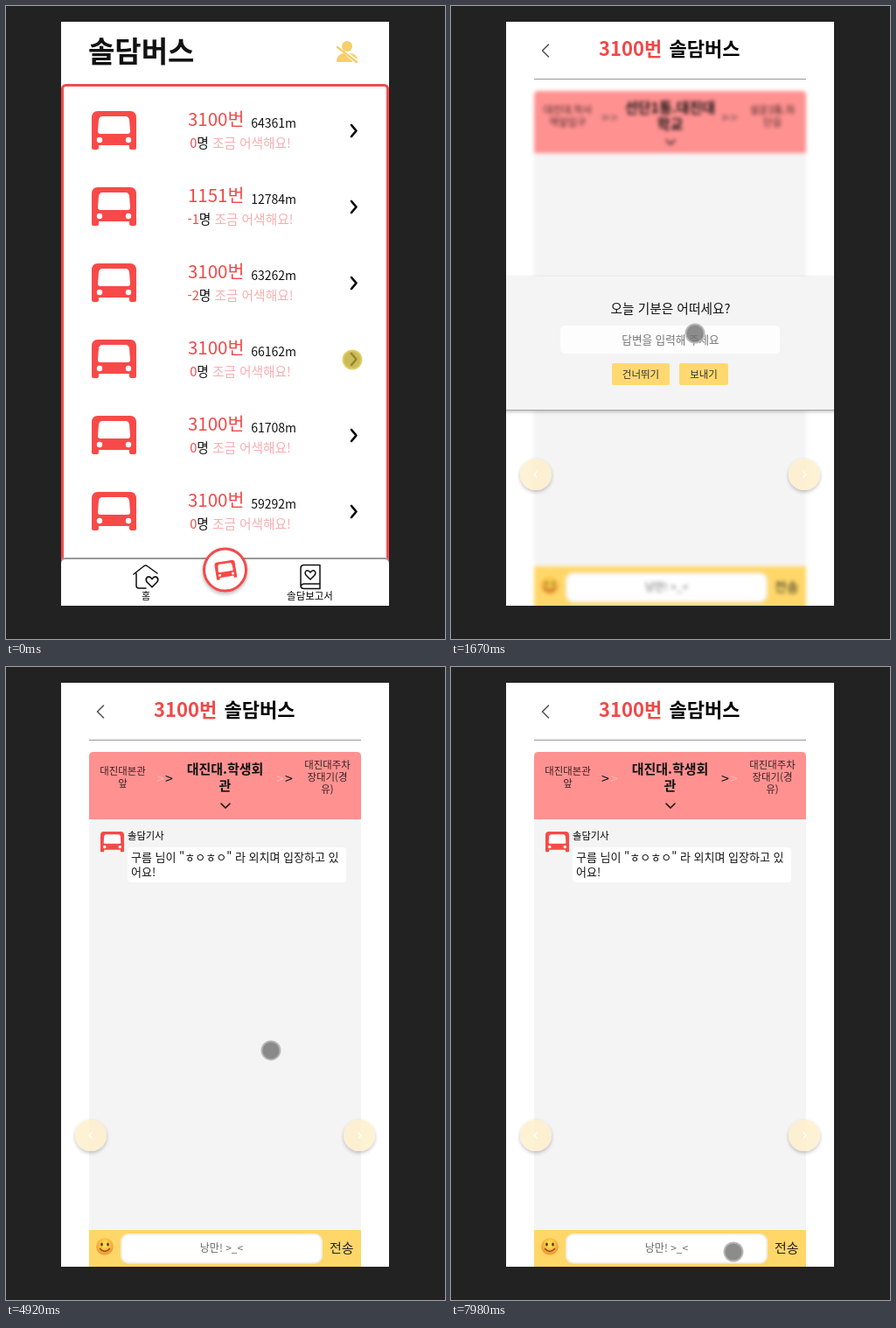
Recreate the animation shown at these times as an HTML page. Size 502x723 px, loop 8 s.

```html
<!DOCTYPE html>
<html lang="ko">
<head>
<meta charset="utf-8">
<style>
  html, body { margin: 0; width: 100%; height: 100%; overflow: hidden; background: #222223; }
  svg { display: block; width: 502px; height: 723px; font-family: 'Noto Sans CJK KR', 'Noto Sans CJK', sans-serif; }
  text { white-space: pre; }
  .mid { text-anchor: middle; }
  .line { fill: none; stroke-linecap: round; stroke-linejoin: round; }
</style>
</head>
<body>
<svg viewBox="0 0 502 723">
  <defs>
    <clipPath id="phone"><rect x="63" y="18" width="375" height="667"/></clipPath>
    <radialGradient id="face" cy=".35">
      <stop offset=".3" stop-color="#ffd84d"/><stop offset="1" stop-color="#f2a03a"/>
    </radialGradient>
    <filter id="drop" x="-30%" y="-30%" width="160%" height="170%">
      <feDropShadow dx="0" dy="2" stdDeviation="2" flood-opacity=".3"/>
    </filter>
    <g id="bus">
      <path fill="#f74a48" d="M7 0H44Q51 0 51 8V42Q51 44 49 44H45Q43 44 43 42V39H8V42Q8 44 6 44H2Q0 44 0 42V8Q0 0 7 0Z"/>
      <path fill="#fff" d="M12 6H39Q42 6 43 10L44 23Q44 26 41 26H10Q7 26 7 23L8 10Q9 6 12 6Z"/>
      <circle cx="9" cy="33" r="3.2" fill="#fff"/><circle cx="42" cy="33" r="3.2" fill="#fff"/>
    </g>
    <path id="heart" d="M0 5L-5 0Q-7 -3 -4.500 -5Q-2 -6 0 -3Q2 -6 4.500 -5Q7 -3 5 0Z"/>
  </defs>
  <rect width="502" height="723" fill="#222223"/>
  <g clip-path="url(#phone)">
    <rect x="63" y="18" width="375" height="667" fill="#fff"/>

    <g id="list">
      <text x="94" y="64" font-size="33" font-weight="900" fill="#111">솔담버스</text>
      <g fill="#f5cf69">
        <circle cx="390" cy="46" r="6"/>
        <path d="M378 64Q378 55 386 54L397 64Z M392 54Q401 54 402 61Z"/>
        <path class="line" stroke="#f5cf69" stroke-width="2.500" d="M379 47L401 64"/>
      </g>
      <rect x="64.500" y="90.500" width="372" height="600" rx="4" fill="#fff" stroke="#f24b4b" stroke-width="3"/>
      <g id="rows"></g>
      <rect x="62" y="631" width="377" height="60" rx="6" fill="#fff" stroke="#999" stroke-width="2"/>
      <g class="line" stroke="#111" stroke-width="1.500">
        <path d="M146 649L158 639.500Q160 638.500 162 640L173 648M149 648V662Q149 665 152 665H160"/>
        <use href="#heart" transform="translate(167 658) scale(1.150)" fill="#fff"/>
        <path d="M359 660V638.500H340Q337 639 337 642V662Q337 665.500 341 665.500H359V660H341Q338 660 337 663"/>
        <use href="#heart" transform="translate(348 650)"/>
      </g>
      <g class="mid">
        <text x="160" y="678" font-size="11">홈</text>
        <text x="347.500" y="678" font-size="11.500">솔담보고서</text>
      </g>
      <circle cx="250.500" cy="644" r="24" fill="#fff" stroke="#f24b4b" stroke-width="3" filter="url(#drop)"/>
      <use href="#bus" transform="translate(238 636) rotate(-9) scale(.46)"/>
    </g>

    <g id="room">
      <path class="line" stroke="#555" stroke-width="1.600" d="M111.500 44L104.500 51L111.500 58"/>
      <g font-size="22" font-weight="900">
        <text x="169" y="57" fill="#f24848">3100번</text>
        <text x="249.500" y="57">솔담버스</text>
      </g>
      <path stroke="#999" d="M95 83.500H406"/>
      <g id="panel">
        <rect x="95" y="100" width="311" height="585" fill="#f4f4f4"/>
        <path id="header" fill="#ff9191"/>
        <g id="stops" class="mid"></g>
        <g id="arrows" font-size="16"></g>
        <path id="down" class="line" stroke="#111" stroke-width="1.500" d="M246 156L251 161L256 156"/>
        <g id="message">
          <use href="#bus" transform="translate(108 188) scale(.53)"/>
          <text x="139" y="197" font-size="11.300">솔담기사</text>
          <rect x="139" y="206" width="250" height="40" rx="4" fill="#fff"/>
          <g font-size="13" fill="#111">
            <text x="143" y="222">구름 님이 "ㅎㅇㅎㅇ" 라 외치며 입장하고 있</text>
            <text x="143" y="238.500">어요!</text>
          </g>
        </g>
        <rect id="bar" x="95" width="311" height="50" fill="#ffd769"/>
        <rect x="132" y="648" width="229" height="32.500" rx="8" fill="#fff" stroke="#f1efe8" stroke-width="2"/>
        <text class="mid" x="246.500" y="668" font-size="12" fill="#666">낭만! &gt;_&lt;</text>
        <text x="370" y="669" font-size="15" fill="#222">전송</text>
        <circle cx="113" cy="662" r="9.800" fill="url(#face)"/>
        <g fill="#5b3a1c"><ellipse cx="109.500" cy="659.500" rx="1.300" ry="2"/><ellipse cx="116.500" cy="659.500" rx="1.300" ry="2"/></g>
        <path class="line" stroke="#8a4a1c" stroke-width="1.400" d="M107.500 664.500Q113 670.500 118.500 664.500"/>
      </g>
      <g filter="url(#drop)" opacity=".8">
        <circle cx="97" cy="535" r="18" fill="#feefca"/><circle cx="404" cy="535" r="18" fill="#feefca"/>
      </g>
      <path class="line" stroke="#fff" stroke-width="1.300" d="M98 532L95 535L98 538M403 532L406 535L403 538"/>
    </g>

    <g id="modal">
      <rect x="55" y="309" width="391" height="152" fill="#f4f4f4" filter="url(#drop)"/>
      <path stroke="#aaa" d="M63 461.500H438"/>
      <rect x="125" y="365" width="251" height="32" rx="5" fill="#fdfdfd"/>
      <g fill="#ffd970"><rect x="184" y="408" width="66" height="25" rx="2"/><rect x="261" y="408" width="56" height="25" rx="2"/></g>
      <g class="mid" font-size="11.500" fill="#333">
        <text x="251" y="351" font-size="14.700" fill="#111">오늘 기분은 어떠세요?</text>
        <text id="hint" x="251" y="385.500" font-size="12.600" fill="#757575">답변을 입력해 주세요</text>
        <text x="217" y="425">건너뛰기</text>
        <text x="289" y="425">보내기</text>
      </g>
      <text id="answer" x="126.500" y="388" font-size="13.500" fill="#111"></text>
      <rect id="caret" y="375" width="1" height="16" fill="#111"/>
    </g>
  </g>
  <g id="cursor"><circle r="10.500" stroke-width="2"/></g>
</svg>
<script>
const LOOP = 8000, REVEAL = 3350;
const $ = id => document.getElementById(id);
const clamp = v => Math.min(1, Math.max(0, v));
const ramp = (t, from, to) => clamp((t - from) / (to - from));
const show = (el, on) => el.setAttribute('visibility', on ? 'visible' : 'hidden');

const buses = [['3100', 64361, 0], ['1151', 12784, -1], ['3100', 63262, -2],
               ['3100', 66162, 0], ['3100', 61708, 0], ['3100', 59292, 0]];
$('rows').innerHTML = buses.map(([route, metres, people], i) => `
  <g transform="translate(0 ${i * 87})">
    <use href="#bus" x="98" y="120"/>
    <text class="mid" x="270" y="137" font-size="20.500" fill="#f24848">${route}번<tspan
      dx="8" dy="2" font-size="14" fill="#111">${metres}m</tspan></text>
    <text class="mid" x="268" y="162" font-size="14.700" fill="#f24848">${people}<tspan
      fill="#111">명</tspan><tspan fill="#f9adb0"> 조금 어색해요!</tspan></text>
    <path class="line" stroke="#000" stroke-width="2.600" d="M395 136L400.500 142.500L395 149"/>
  </g>`).join('');

// Stop names: previous, current, next.
const waiting = [['대진대.학사', '역앞입구'], ['선단1통.대진대', '학교'], ['설운3통.하', '단길']];
const arrived = [['대진대본관', '앞'], ['대진대.학생회', '관'], ['대진대주차', '장대기(경', '유)']];
const stopLines = (stops, big) => stops.map((lines, i) => {
  const main = i === 1, step = main ? 19 : 14;
  const top = main ? 122 : lines.length > 2 ? 116 : 123;
  return lines.map((s, n) => `<text x="${[133.5, 250.5, 367.5][i]}" y="${top + n * step}"
    font-size="${main ? big : 11.4}" font-weight="${main ? 700 : 400}"
    fill="${main ? '#111' : '#3a2222'}">${s}</text>`).join('');
}).join('');

$('arrows').innerHTML = [172, 182, 309, 319].map(x =>
  `<text x="${x}" y="133" fill="#ffb3ab">&gt;</text><text class="tip" x="${x}" y="133" fill="#111">&gt;</text>`).join('');
const tips = [...document.querySelectorAll('.tip')];

const path = [[0, 396, 404], [380, 396, 404], [700, 392, 426], [1000, 365, 415], [1500, 282, 376],
  [1670, 279, 374], [3100, 279, 374], [3240, 288, 424], [3360, 289, 425], [3540, 297, 441],
  [3900, 301, 441], [4770, 302, 437], [4930, 303, 438], [5250, 385, 580], [5560, 457, 728],
  [5800, 469, 738], [6100, 425, 716], [6430, 343, 667], [6700, 323, 668], [8000, 323, 668]];
const presses = [[0, 60], [1760, 1860], [3240, 3340]];

function cursorAt(t) {
  const i = Math.max(1, path.findIndex(p => p[0] > t));
  const [a, b] = [path[i - 1], path[i]];
  const k = ramp(t, a[0], b[0]);
  return [a[1] + (b[1] - a[1]) * k, a[2] + (b[2] - a[2]) * k];
}

let stopState;
function drawStops(t) {
  const state = t < REVEAL ? 0 : t < 3950 ? 1 : 2;
  if (state === stopState) return;
  stopState = state;
  $('stops').innerHTML = stopLines(state ? arrived : waiting, state < 2 ? 16 : 15);
  $('header').setAttribute('d', `M95 ${state ? 174 : 168}V102Q95 97 100 97H401Q406 97 406 102V${state ? 174 : 168}Z`);
  $('down').setAttribute('transform', `translate(0 ${state ? 0 : -3})`);
  $('bar').setAttribute('y', state ? 643 : 640);
  $('panel').style.filter = state ? 'none' : 'blur(2px)';
  show($('message'), state);
}

function render(t) {
  $('list').setAttribute('opacity', 1 - ramp(t, 380, 712));
  $('room').setAttribute('opacity', ramp(t, 760, 1160));
  $('modal').setAttribute('opacity', t < REVEAL ? ramp(t, 1200, 1560) : 1 - ramp(t, REVEAL + 30, 3760));
  drawStops(t);

  const typed = [2090, 2190, 2290, 2390].filter(at => t >= at).length;
  $('answer').textContent = 'ㅎㅇㅎㅇ'.slice(0, typed);
  show($('hint'), !typed);
  show($('caret'), typed && t < 2870);
  $('caret').setAttribute('x', 127 + typed * 12.42);

  const wave = shift => Math.cos((t - shift) / 1000 * Math.PI);
  const first = clamp(.4 + .6 * wave(0)), second = clamp(.65 - .75 * wave(150));
  tips.forEach((tip, i) => tip.setAttribute('opacity', i % 2 ? second : first));

  const pressed = presses.some(([from, to]) => t >= from && t < to);
  const dot = $('cursor').firstElementChild;
  $('cursor').setAttribute('transform', `translate(${cursorAt(t)})`);
  dot.setAttribute('fill', pressed ? 'rgba(190,170,50,.8)' : 'rgba(115,115,115,.82)');
  dot.setAttribute('stroke', pressed ? 'rgba(222,205,95,.9)' : 'rgba(180,180,180,.9)');
}

const start = performance.now();
function tick() {
  render((performance.now() - start) % LOOP);
  requestAnimationFrame(tick);
}
tick();
</script>
</body>
</html>
```
